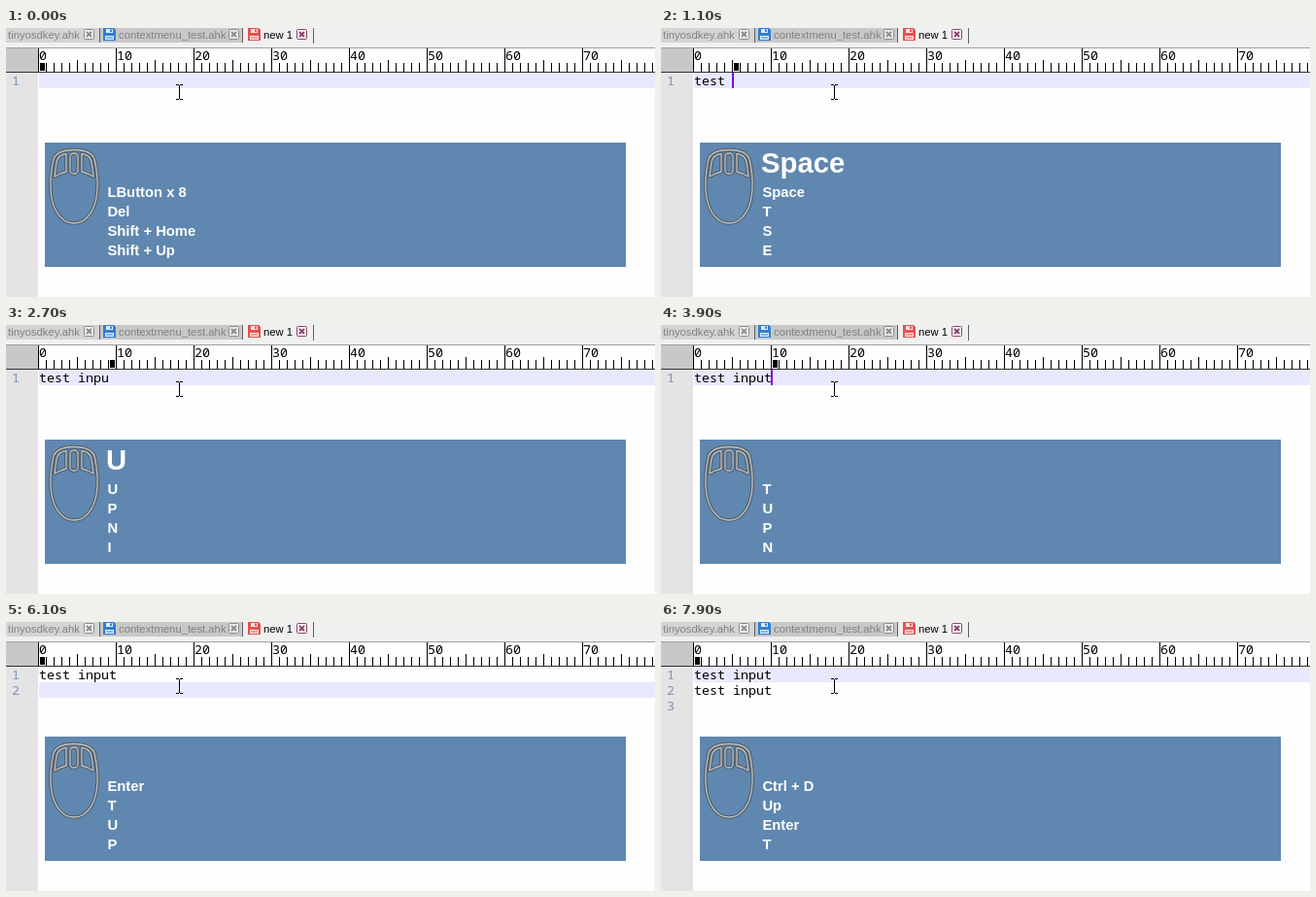
An HTML page that plays this animation: 668x277 px, repeating every 8 s.

```html
<!DOCTYPE html>
<html lang="en">
<head>
<meta charset="utf-8">
<title>Key display over a text editor</title>
<style>
  html, body { margin: 0; width: 100%; height: 100%; overflow: hidden; background: #fefefe; }
  svg { display: block; width: 668px; height: 277px; }
  text { white-space: pre; }
  .mono { font: 13.33px "Noto Sans Mono", "DejaVu Sans Mono", monospace; }
  .tab { font: 11.3px "Liberation Sans", Arial, sans-serif; fill: #808080; }
  .osd { font: bold 14.8px "Liberation Sans", Arial, sans-serif; fill: #fff; }
  .big { font-size: 29.33px; }
</style>
</head>
<body>
<svg id="stage" viewBox="0 0 668 277" xmlns="http://www.w3.org/2000/svg">
  <defs>
    <g id="disk">
      <path d="M0 0H11L13 2V13H0Z"/>
      <path d="M3 1H10V5H3ZM2 8H11V12H2Z" fill="#fff" opacity=".85"/>
      <path d="M7 1.5H9V4H7ZM3 9.5H10V10.5H3Z"/>
    </g>
    <g id="close">
      <rect x=".5" y=".5" width="10" height="10" rx="1" fill="#fff" fill-opacity=".6"/>
      <path d="M3 3L8 8M8 3L3 8" stroke-width="2"/>
    </g>
    <g id="mouse" fill="none" stroke-linejoin="round">
      <path d="M70 125.500C58 125.500 50 129 48.500 137C46.500 147 45.500 157 46 165C46.500 184 55 201 70 201C85 201 93.500 184 94 165C94.500 157 93.500 147 91.500 137C90 129 82 125.500 70 125.500Z"/>
      <path id="button" d="M50 153L52 138C53 133 57 130 62 129.500V148C58 149 54 150.500 50 153Z"/>
      <use href="#button" transform="matrix(-1 0 0 1 140 0)"/>
      <rect x="66" y="129" width="8" height="21" rx="3.5"/>
    </g>
  </defs>

  <rect width="668" height="277" fill="#fefefe"/>
  <rect width="668" height="20" fill="#f0f0f0"/>
  <rect width="96" height="15" fill="#d4d4d4"/>
  <rect x="97" width="146" height="15" fill="#c8c8c8"/>
  <path d="M96.500 0V15M243.500 0V15M316.500 0V16" stroke="#606060"/>
  <path d="M0 20.500H668" stroke="#a0a0a0"/>
  <text class="tab" x="2" y="11">tinyosdkey.ahk</text>
  <text class="tab" x="116" y="11">contextmenu_test.ahk</text>
  <text class="tab" x="265" y="11" style="fill:#000">new 1</text>
  <use href="#disk" x="100" y="0" fill="#2f7fd6"/>
  <use href="#disk" x="249" y="0" fill="#e85050"/>
  <use href="#close" x="80" y="1" stroke="#8c8c8c"/>
  <use href="#close" x="229" y="1" stroke="#8c8c8c"/>
  <use href="#close" x="299" y="1" stroke="#8a4468"/>

  <rect y="21" width="33" height="24" fill="#c8c8c8"/>
  <rect y="46" width="33" height="231" fill="#e4e4e4"/>
  <path id="ticks" stroke="#000"/>
  <path d="M0 45.500H668" stroke="#303030"/>
  <g id="scale" class="mono"></g>
  <rect id="marker" y="36" width="5" height="8"/>

  <rect id="current" x="34" width="634" height="16" fill="#e8e8ff"/>
  <g id="lines" class="mono"></g>
  <rect id="caret" width="2" height="16" fill="#8000e0"/>
  <path d="M175 58.500H178M179 58.500H182M178.500 59V73M175 73.500H178M179 73.500H182" fill="none" stroke="#000"/>

  <rect x="40" y="118" width="598" height="128" fill="#5f87af"/>
  <use href="#mouse" stroke="#4c5560" stroke-width="3.600" opacity=".8"/>
  <use href="#mouse" stroke="#c4c3bc" stroke-width="1.300"/>
  <text id="big" class="osd big" x="103" y="149"></text>
  <g id="log" class="osd"></g>
</svg>
<script>
const LOOP = 8000, STEP = 100, BLINK = 230, HOLD = 660;
const COL = 8, ROW = 16, PHRASE = "test input";
const earlier = ["Shift + Up", "Shift + Home", "Del", "LButton x 8"];
const keys = [
  [100, "T"], [300, "E"], [600, "S"], [900, "T"], [1100, "Space"],
  [1340, "I"], [1590, "N"], [1900, "P"], [2500, "U"], [3000, "T"],
  [4000, "Enter"], [6350, "Up"], [7255, "Ctrl + D"]
];

const $ = id => document.getElementById(id);

function addText(parent, x, y, text, fill) {
  const el = document.createElementNS("http://www.w3.org/2000/svg", "text");
  place(el, { x, y });
  if (fill) el.setAttribute("fill", fill);
  el.textContent = text;
  parent.append(el);
  return el;
}

function place(el, attrs) {
  for (const name in attrs) el.setAttribute(name, attrs[name]);
}

let ticks = "";
for (let i = 0; i < 80; i++) {
  const top = i % 10 === 0 ? 21 : i % 5 === 0 ? 33 : 36;
  ticks += `M${33.5 + i * COL} ${top}V45`;
  if (i % 10 === 0) addText($("scale"), 34 + i * COL, 33, i);
}
$("ticks").setAttribute("d", ticks);

const rows = [0, 1, 2].map(i => ({
  number: addText($("lines"), 6, 59 + i * ROW, i + 1, "#7f93b4"),
  body: addText($("lines"), 34, 59 + i * ROW, "")
}));
const logRows = [0, 1, 2, 3].map(i => addText($("log"), 104.4, 174 + i * 20, ""));

function render(time) {
  // The screen is sampled in steps; events snap to the nearest one.
  const now = Math.floor(time / STEP) * STEP + STEP / 2 - 1;
  const pressed = keys.filter(([at]) => at <= now);
  const names = pressed.map(([, name]) => name);
  const last = pressed[pressed.length - 1];
  const age = last ? now - last[0] : Infinity;

  const typed = PHRASE.slice(0, pressed.length);
  const entered = names.includes("Enter");
  const copied = names.includes("Ctrl + D");
  const row = entered && !names.includes("Up") ? 1 : 0;
  const col = entered ? 0 : typed.length;
  const count = copied ? 3 : entered ? 2 : 1;

  rows.forEach(({ number, body }, i) => {
    number.style.display = i < count ? "" : "none";
    body.textContent = i === 0 || (i === 1 && copied) ? typed : "";
  });
  place($("current"), { y: 46 + row * ROW });
  place($("marker"), { x: 35 + col * COL });
  place($("caret"), {
    x: Math.max(34, 33 + col * COL),
    y: 46 + row * ROW,
    visibility: last && Math.floor(age / BLINK) % 2 === 0 ? "visible" : "hidden"
  });

  const recent = [...earlier, ...names].slice(-4).reverse();
  logRows.forEach((el, i) => { el.textContent = recent[i]; });
  $("big").textContent = age < HOLD ? last[1] : "";
}

const start = performance.now();
function tick() {
  render((performance.now() - start) % LOOP);
  requestAnimationFrame(tick);
}
render(0);
requestAnimationFrame(tick);
</script>
</body>
</html>
```
